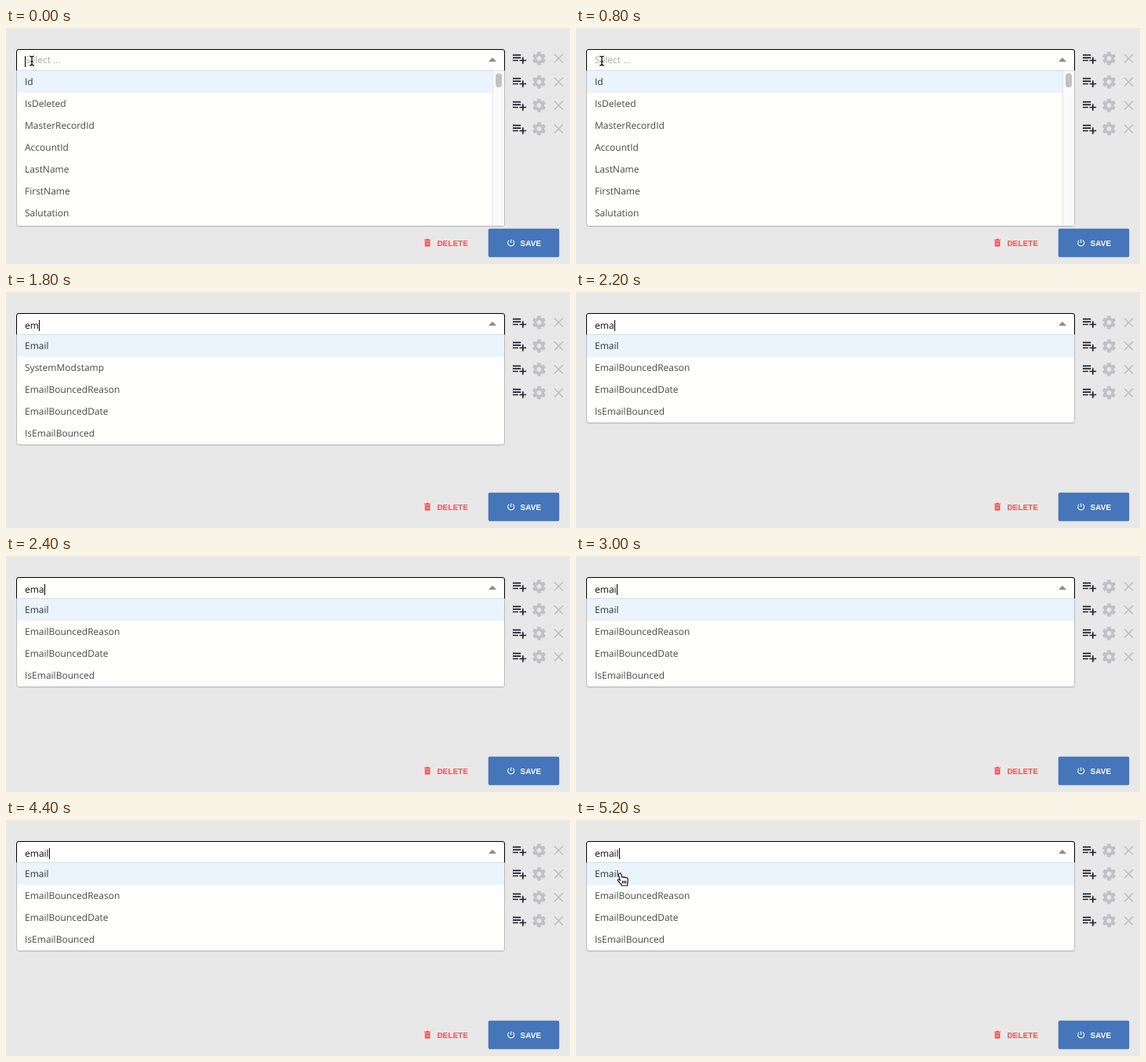
These frames come from a looping animation (720x302 px, 5.4 s). An HTML page:

```html
<!DOCTYPE html>
<html lang="en">
<head>
<meta charset="utf-8">
<style>
  html, body { margin: 0; width: 100%; height: 100%; overflow: hidden; background: #e8e8e8; }
  svg { display: block; }
  text { font: 12px "Open Sans", sans-serif; fill: #484848; white-space: pre; text-rendering: geometricPrecision; }
  .button { font: bold 10px "Liberation Sans", Arial, sans-serif; }
</style>
</head>
<body>
<svg width="720" height="302" viewBox="0 0 720 302">
  <defs>
    <g id="tools">
      <path transform="translate(645.2 28.6) scale(.86)" fill="#22222c"
        d="M2 16h8v-2H2M18 14v-4h-2v4h-4v2h4v4h2v-4h4v-2M14 6H2v2h12M14 10H2v2h12z"/>
      <g transform="translate(680.5 39)" fill="none" stroke="#c0c0c5">
        <circle r="4.7" stroke-width="3.4"/>
        <g id="teeth" stroke-width="4.4"><path d="M0-8.5v3M0 8.5v-3"/></g>
        <use href="#teeth" transform="rotate(60)"/>
        <use href="#teeth" transform="rotate(120)"/>
      </g>
      <path d="M700 33.5l11 11m0-11l-11 11" stroke="#c0c0c5" stroke-width="1.6"/>
    </g>
    <path id="beamLine" d="M-3-6q3 0 3 2v8q0 2-3 2M3-6q-3 0-3 2v8q0 2 3 2M-2 1h4"/>
  </defs>

  <use href="#tools"/>
  <use href="#tools" y="30"/>
  <use href="#tools" y="60"/>
  <use href="#tools" y="90"/>

  <path d="M13.5 55V30q0-2.5 2.5-2.5h618q2.5 0 2.5 2.5V55" fill="#fefefd" stroke="#000"/>
  <path d="M616 43l5-5 5 5z" fill="#888"/>
  <text id="input" x="24"></text>
  <path id="caret" d="M0 36v14" stroke="#000"/>

  <path id="shadow" fill="none" stroke="#000" stroke-opacity=".07"/>
  <path id="panel" fill="#fefefd" stroke="#b9bbbd"/>
  <path d="M14 54.5h622" stroke="#d8dde2"/>
  <path d="M14 55h622v28H14z" fill="#eaf4fd"/>
  <g id="scroll">
    <path d="M621 55h15v198h-15z" fill="#fafafa"/>
    <path d="M621.5 55v198" stroke="#e6e6e6"/>
    <rect id="thumb" x="625" y="58" width="8" rx="4" fill="#c1c1c1"/>
  </g>
  <g id="list"></g>

  <g fill="none" stroke="#f0504f">
    <path d="M534 271.3h8M536.5 270.4h3" stroke-width="1.2"/>
    <path d="M534.7 272.6h6.6v7h-6.6z" fill="#f0504f" stroke="none"/>
    <path d="M536.4 274.5l3.2 3.2m0-3.2l-3.2 3.2" stroke="#e8e8e8" stroke-width=".9"/>
  </g>
  <text class="button" x="550.4" y="278.6" style="fill:#f0504f">DELETE</text>
  <rect x="615.7" y="256.7" width="90.6" height="36.6" rx="2" fill="#4476b9"/>
  <path d="M644.7 270.5v4.5M642.3 271.8a4 4 0 1 0 4.8 0" fill="none" stroke="#fff" stroke-width="1.1"/>
  <text class="button" x="656.6" y="278.6" style="fill:#fff">SAVE</text>

  <g id="beam" fill="none">
    <use href="#beamLine" stroke="#fff" stroke-width="2.8"/>
    <use href="#beamLine" stroke="#000" stroke-width="1.2"/>
  </g>
  <g id="hand" fill="#fff" stroke="#111" stroke-width="1.2" stroke-linejoin="round">
    <path d="M-3-7.5q1.4-1.2 2.4.4L1-2.5q.8-1.2 2.2 0 1-1 2.2.3 2.2-.6 2.7 1.7.7 2.8-.4 5.2V8H0V6.2Q-2.5 4.3-4.3 1.8-5.3.2-4 0q1.2-.2 2.4 1.5L-3.7-5.7q-.4-1.2.7-1.8z"/>
    <path d="M1.5 1.7v3.5M3.5 1.7v3.5M5.5 1.7v3.5"/>
  </g>
</svg>
<script>
  const LOOP = 5400, MOVE_START = 4600, MOVE_END = 5200;
  const bounced = "EmailBouncedReason EmailBouncedDate IsEmailBounced";
  const matches = {
    "": "Id IsDeleted MasterRecordId AccountId LastName FirstName Salutation",
    e: "IsDeleted MasterRecordId LastName FirstName Name OtherStreet OtherCity",
    em: "Email SystemModstamp " + bounced,
    ema: "Email " + bounced
  };
  const keys = [[0, ""], [1400, "e"], [1800, "em"], [2200, "ema"], [2800, "emai"], [3150, "email"]];
  const el = id => document.getElementById(id);
  const set = (id, attrs) => {
    for (const name in attrs) el(id).setAttribute(name, attrs[name]);
  };
  const show = (id, on) => { el(id).style.display = on ? "" : "none"; };
  const outline = bottom => `M13.5 54.5V${bottom - 3}q0 3 3 3h617q3 0 3-3V54.5`;
  let shown = null;

  function setQuery(query) {
    const names = matches[query.slice(0, 3)].split(" ");
    const long = names.length > 5;
    const bottom = long ? 253.5 : 55.5 + names.length * 28;
    el("input").textContent = query || "Select ...";
    set("input", { y: query ? 47 : 45, style: `fill:${query ? "#111" : "#aaa"}` });
    set("panel", { d: outline(bottom) });
    set("shadow", { d: outline(bottom + 1) });
    set("thumb", { height: query ? 23 : 18 });
    show("scroll", long);
    el("list").innerHTML = names.map((name, i) =>
      `<text x="24" y="${73 + i * 28}"${i ? "" : ' style="fill:#333"'}>${name}</text>`).join("");
    shown = query;
  }

  function draw(now) {
    const t = now % LOOP;
    const [pressed, query] = keys.filter(key => key[0] <= t).pop();
    if (query !== shown) setQuery(query);

    const caretX = query ? 24.5 + Math.round(el("input").getComputedTextLength()) : 24.5;
    set("caret", { transform: `translate(${caretX})` });
    show("caret", (t - pressed) % 1000 < 500);

    // The pointer hides while typing and returns when it moves.
    const p = Math.min(1, Math.max(0, (t - MOVE_START) / (MOVE_END - MOVE_START)));
    const ease = p * p * (3 - 2 * p);
    const x = 33 + 25 * ease, y = 42 + 34 * ease;
    const inList = y > 54;
    show("beam", !query || (p > 0 && !inList));
    show("hand", inList);
    set("beam", { transform: `translate(${x} ${y})` });
    set("hand", { transform: `translate(${x} ${y})` });
  }

  function frame() {
    draw(performance.now());
    requestAnimationFrame(frame);
  }
  frame();
</script>
</body>
</html>
```
